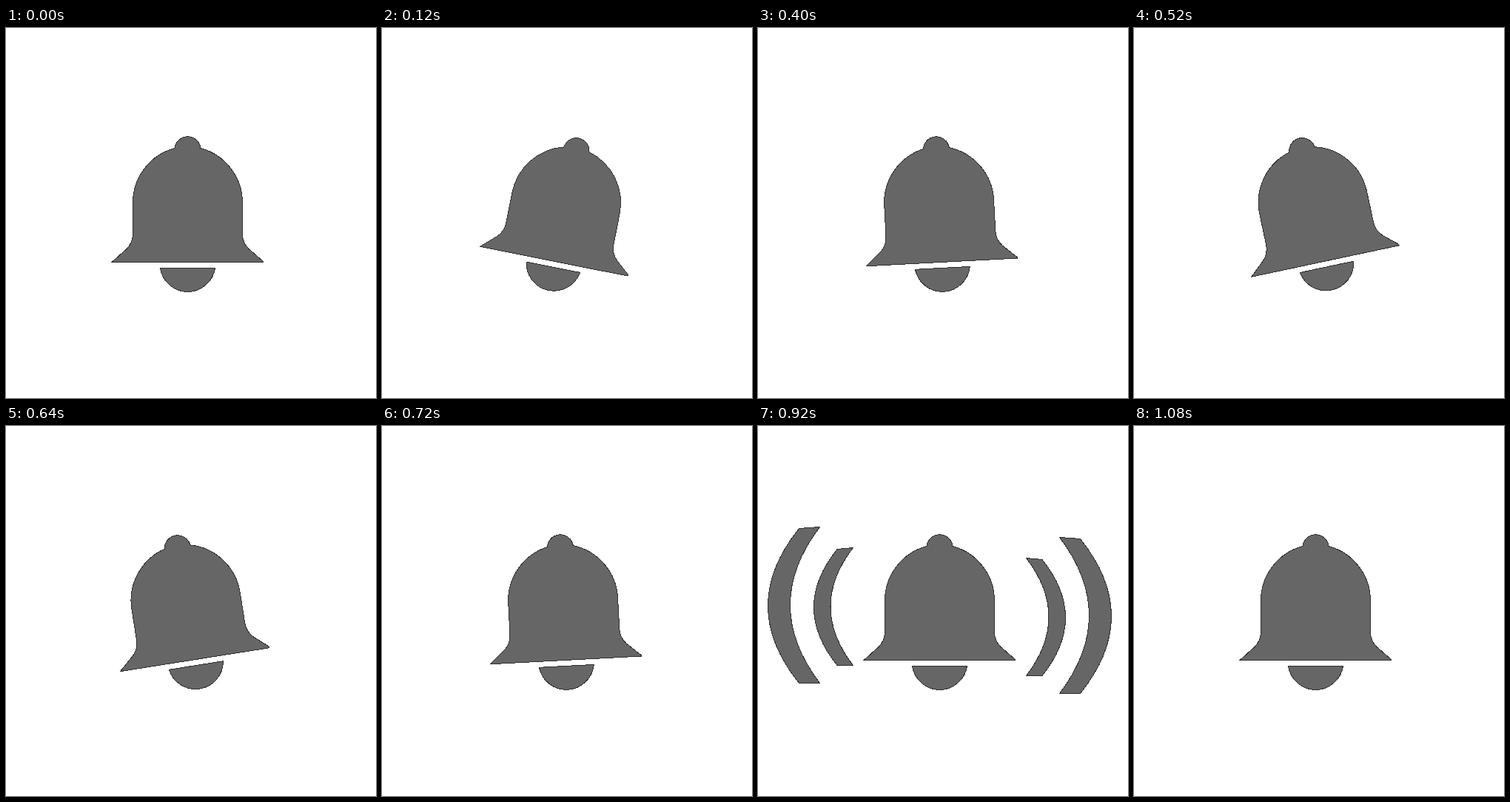
Write an HTML page that moves like this. It is 500x500 px and loops after 1440 ms.

```html
<!DOCTYPE html>
<html lang="en">
<head>
<meta charset="utf-8">
<title>Ringing bell</title>
<style>
  html, body { margin: 0; width: 100%; height: 100%; overflow: hidden; background: #fff; }
  svg {
    display: block; width: 100vw; height: 100vh;
    fill: #666; stroke: #303030; stroke-width: 1; shape-rendering: crispEdges;
  }
</style>
</head>
<body>
<svg viewBox="0 0 500 500">
  <g id="bell">
    <path d="M143 316.5 L163 298.5 Q171.5 290 171.5 278 V236 A76 76 0 0 1 228 162.5
             A17.6 17.6 0 0 1 263 162.5 A76 76 0 0 1 319.5 236 V278 Q319.5 290 328 298.5
             L347 315 V316.5 Z"/>
    <path d="M208.5 324.5 H282.5 A37.4 37.4 0 0 1 208.5 324.5 Z"/>
  </g>
  <defs>
    <path id="near" d="M107 166.5 L128.5 164.5 Q67.5 244 128.5 323.5 H107 Q44 245 107 166.5 Z"/>
    <path id="far" d="M55.5 138.5 L83.5 136.5 Q3.5 242 83.5 347.5 H55.5 Q-28.5 243 55.5 138.5 Z"/>
  </defs>
  <g id="nearWaves">
    <use href="#near"/>
    <use href="#near" transform="translate(491 14) scale(-1 1)"/>
  </g>
  <g id="farWaves">
    <use href="#far"/>
    <use href="#far" transform="translate(491 14) scale(-1 1)"/>
  </g>
</svg>
<script>
  const LOOP = 1440, STEP = 40, PEAK = 15;
  const [bell, nearWaves, farWaves] =
    ["bell", "nearWaves", "farWaves"].map(id => document.getElementById(id));

  // Swing right, across to the left, then back to rest.
  function swing(t) {
    if (t < 160) return PEAK * t / 160;
    if (t < 560) return PEAK * (360 - t) / 200;
    return Math.min(0, PEAK * (t - 760) / 200);
  }

  const show = (el, on) => el.setAttribute("visibility", on ? "visible" : "hidden");

  function draw() {
    const t = Math.floor(performance.now() % LOOP / STEP) * STEP;
    bell.setAttribute("transform", `rotate(${swing(t)} 245 251.7)`);
    show(nearWaves, t >= 840 && t < 1080);
    show(farWaves, t >= 920 && t < 1000);
    requestAnimationFrame(draw);
  }
  draw();
</script>
</body>
</html>
```
